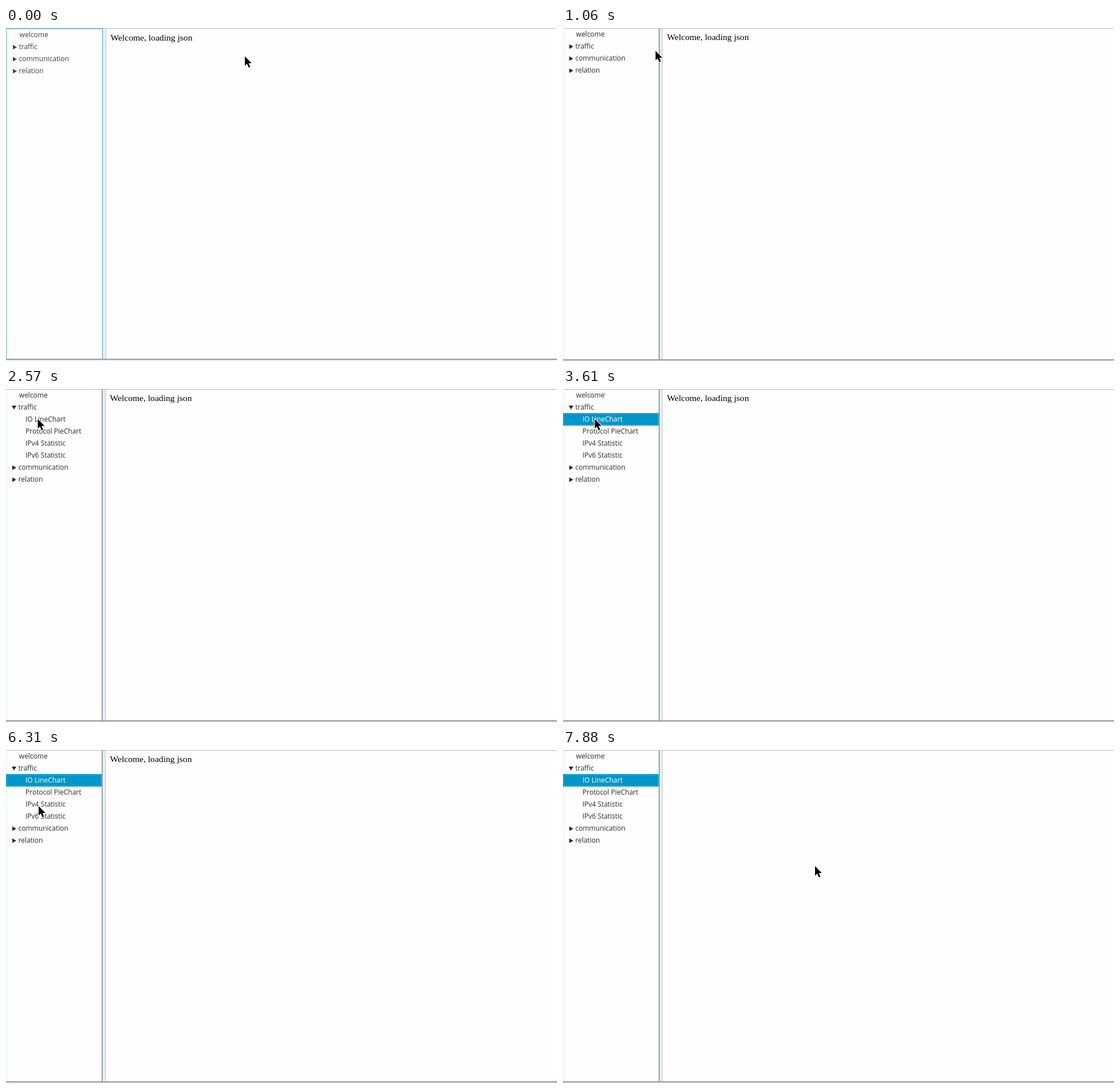
Recreate the animation shown at these times as an HTML page with a canvas. Size 962 px wide and 582 px high, loop 8 s.

```html
<!DOCTYPE html>
<html lang="en">
<head>
<meta charset="utf-8">
<title>Navigation tree</title>
<style>
  html, body { margin: 0; width: 100%; height: 100%; overflow: hidden; background: #fefefe; }
  canvas { display: block; }
</style>
</head>
<body>
<canvas id="stage" width="962" height="582"></canvas>
<script>
const ctx = document.getElementById('stage').getContext('2d');
const WIDTH = 962, HEIGHT = 582, ROW = 21, LOOP = 8000;
const SETTLED = 120, EXPANDED = 1810, SELECTED = 3610, CLEARED = 6730;
const TREE_FONT = '12px "Open Sans", sans-serif';
const PAGE_FONT = '15.6px "Liberation Serif", serif';

const smooth = p => p * p * p * (p * (6 * p - 15) + 10);
const accelerate = p => p ** 3;
const decelerate = p => 1 - (1 - p) ** 2;

// The pointer rests at each stop until the next trip starts.
const HOME = { x: 417, y: 49.5 };
const TRIPS = [
  { start: 670, end: 1450, x: 13, y: 34.5, ease: smooth },
  { start: 2090, end: 2570, x: 55.5, y: 52.5, ease: smooth },
  { start: 4040, end: 4520, x: 55.5, y: 98, ease: smooth },
  { start: 6310, end: 6850, x: 238.5, y: 88.5, ease: accelerate },
  { start: 7000, end: 7630, x: 440, y: 203, ease: decelerate }
];
const POINTER = new Path2D('M0 0V16.5L3.8 13 6.6 19.5 9.4 18.4 6.6 12H11.8Z');
const CLOSED = new Path2D('M1 0L8 4 1 8Z');
const OPEN = new Path2D('M0 .5H8L4 7.5Z');

const CHARTS = ['IO LineChart', 'Protocol PieChart', 'IPv4 Statistic', 'IPv6 Statistic'];

function rect(color, x, y, w, h) {
  ctx.fillStyle = color;
  ctx.fillRect(x, y, w, h);
}

function text(label, x, y, color, font = TREE_FONT) {
  ctx.font = font;
  ctx.fillStyle = color;
  ctx.fillText(label, x, y);
}

function shape(path, x, y, color, outline) {
  ctx.save();
  ctx.translate(x, y);
  if (outline) {
    ctx.strokeStyle = outline;
    ctx.lineWidth = 2;
    ctx.stroke(path);
  }
  ctx.fillStyle = color;
  ctx.fill(path);
  ctx.restore();
}

// Screen-capture motion: each trip advances in equal ticks of about 130 ms.
function pointerAt(t) {
  let { x, y } = HOME;
  for (const trip of TRIPS) {
    if (t < trip.start) break;
    const duration = trip.end - trip.start;
    const ticks = Math.round(duration / 130);
    const tick = Math.min(ticks, Math.floor((t - trip.start) / duration * ticks));
    const p = trip.ease((tick + 1) / (ticks + 1));
    x += (trip.x - x) * p;
    y += (trip.y - y) * p;
  }
  return { x, y };
}

function drawPanes(focused) {
  const shift = focused ? 1 : 0;
  const bottom = 579 - shift;
  rect('#fefefe', 0, 0, WIDTH, HEIGHT);
  rect(focused ? '#5fb4d6' : '#dff6f6', 0, 1, 1, bottom - 1);
  if (focused) rect('#5fb4d6', 0, 1, 169, 1);
  rect('#efefef', 169, 1, 4 + shift, bottom - 1);
  rect('#c4c4c4', 173 + shift, 1, 1, bottom - 1);
  if (!focused) rect('#7fb2cc', 167, 1, 1, bottom - 1);
  rect(focused ? '#2fa3d0' : '#9a9a9a', 168, 1, 1, bottom - 1);
  rect('#999', 0, bottom, WIDTH, 2);
  rect('#eaeaea', 0, bottom + 2, WIDTH, 1 + shift);
  rect('#b8b8b8', 0, 0, WIDTH, 1);
}

function drawSelection(y) {
  rect('#0096c9', 0, y, 167, ROW + 1);
  ctx.strokeStyle = '#30acd6';
  ctx.lineWidth = 1;
  ctx.strokeRect(1.5, y + 1.5, 164, ROW - 2);
}

function drawTree(t, color) {
  let baseline = 15.4;
  text('welcome', 22.8, baseline, color);
  for (const group of ['traffic', 'communication', 'relation']) {
    baseline += ROW;
    const open = group === 'traffic' && t >= EXPANDED;
    shape(open ? OPEN : CLOSED, 10, baseline - 8, color);
    text(group, 21.5, baseline, color);
    for (const chart of open ? CHARTS : []) {
      baseline += ROW;
      const selected = chart === CHARTS[0] && t >= SELECTED;
      if (selected) drawSelection(42);
      text(chart, 34, baseline, selected ? '#fff' : color);
    }
  }
}

function draw(t) {
  const focused = t < SETTLED;
  drawPanes(focused);
  ctx.save();
  if (focused) ctx.translate(1, 1);
  drawTree(t, focused ? '#404040' : '#2a2a2a');
  if (t < CLEARED) text('Welcome, loading json', 181.5, 21, '#000', PAGE_FONT);
  ctx.restore();
  const { x, y } = pointerAt(t);
  shape(POINTER, x, y, '#000', '#fefefe');
}

const origin = performance.now();
function frame() {
  draw((performance.now() - origin) % LOOP);
  requestAnimationFrame(frame);
}
frame();
</script>
</body>
</html>
```
